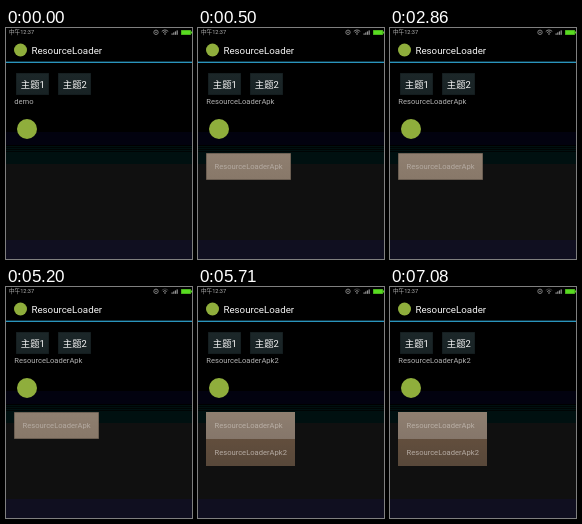
Write an HTML page with a canvas that moves like this. It is 186x231 px and loops after 8 s.

```html
<!DOCTYPE html>
<html lang="en">
<head>
<meta charset="utf-8">
<title>Theme demo</title>
<style>
html, body { margin: 0; width: 100%; height: 100%; overflow: hidden; background: #000; }
canvas { display: block; width: 186px; height: 231px; }
</style>
</head>
<body>
<canvas id="stage"></canvas>
<script>
const W = 186, H = 231, LOOP = 8000;
const FIRST_THEME = 500, WIFI_CHANGE = 4440, SECOND_THEME = 5710;
const canvas = document.getElementById('stage');
const ctx = canvas.getContext('2d');
const ratio = window.devicePixelRatio || 1;
canvas.width = W * ratio;
canvas.height = H * ratio;
ctx.scale(ratio, ratio);

function rect(x, y, w, h, fill) {
  ctx.fillStyle = fill;
  ctx.fillRect(x, y, w, h);
}

function text(str, x, y, size, fill) {
  ctx.font = `${size}px Roboto, "Noto Sans CJK SC", "Noto Sans CJK", sans-serif`;
  ctx.fillStyle = fill;
  ctx.fillText(str, x, y);
}

function disc(x, y, r, fill) {
  ctx.fillStyle = fill;
  ctx.beginPath();
  ctx.arc(x, y, r, 0, Math.PI * 2);
  ctx.fill();
}

function arc(x, y, r, from, to, color) {
  ctx.strokeStyle = color;
  ctx.lineWidth = 0.9;
  ctx.beginPath();
  ctx.arc(x, y, r, from, to);
  ctx.stroke();
}

function gradient(y0, y1, ...colors) {
  const g = ctx.createLinearGradient(0, y0, 0, y1);
  colors.forEach((c, i) => g.addColorStop(i / (colors.length - 1), c));
  return g;
}

function background() {
  rect(0, 0, W, H, '#000');
  rect(0, 104, W, 13, '#02020f');
  rect(0, 118, W, 18, '#001010');
  for (let y = 119; y < 125; y += 2) rect(0, y, W, 1, '#000404');
  rect(0, 136, W, 76, '#101010');
  rect(0, 212, W, 19, '#100f20');
}

function statusBar(t) {
  text('中午12:37', 3, 6.4, 5.6, '#b4b4b4');
  arc(150, 4.3, 2.2, 0, Math.PI * 2, '#8c8c8c');
  rect(149.2, 3.8, 1.6, 1, '#8c8c8c');

  const outer = t < WIFI_CHANGE ? '#a0a0a0' : '#484848';
  arc(159, 6.2, 4.2, -Math.PI * 0.78, -Math.PI * 0.22, outer);
  arc(159, 6.2, 2.4, -Math.PI * 0.78, -Math.PI * 0.22, '#a0a0a0');
  disc(159, 6, 0.8, '#a0a0a0');

  for (let i = 0; i < 4; i++) rect(165.5 + i * 1.7, 5.4 - i, 1.2, 1.4 + i, '#969696');

  rect(175, 2, 10, 5, '#3f8a1c');
  rect(175.5, 2.5, 9, 4, '#58dc20');
  rect(185, 3.5, 1, 2, '#58dc20');
}

function actionBar() {
  disc(14.5, 22, 6.5, '#8fae3c');
  text('ResourceLoader', 25.4, 25.8, 9.75, '#f4f4f4');
  rect(0, 33, W, 1, '#103644');
  rect(0, 34, W, 1, '#2a94bc');
}

function button(label, x) {
  rect(x, 45, 33, 22, '#10181a');
  rect(x + 0.5, 45.5, 32, 21, gradient(45, 67, '#1c2729', '#182224'));
  text(label, x + 4.8, 59.5, 9.4, '#f6f6f6');
}

function menuItem(label, y, w, top, bottom, color) {
  rect(8, y, w, 27, gradient(y, y + 27, top, bottom));
  text(label, 16.5, y + 16, 7.6, color);
}

function draw(t) {
  background();
  statusBar(t);
  actionBar();
  button('主题1', 10);
  button('主题2', 52);
  disc(21, 101, 10, '#8fae3c');

  const apk = 'ResourceLoaderApk';
  const label = t < FIRST_THEME ? 'demo' : t < SECOND_THEME ? apk : apk + '2';
  text(label, 8.3, 76, 7.6, '#b0b0b0');

  if (t >= SECOND_THEME) {
    menuItem(apk, 125, 89, '#8f7f70', '#85766a', '#b9afa6');
    menuItem(apk + '2', 152, 89, '#624e3d', '#58483a', '#b4aaa2');
  } else if (t >= FIRST_THEME) {
    rect(8, 125, 85, 27, '#4c4239');
    rect(8.5, 125.5, 84, 26, gradient(125, 152, '#8f7f70', '#887869'));
    text(apk, 16.5, 141, 7.6, '#b5aba2');
  }
}

function tick(now) {
  draw(now % LOOP);
  requestAnimationFrame(tick);
}
draw(0);
requestAnimationFrame(tick);
</script>
</body>
</html>
```
